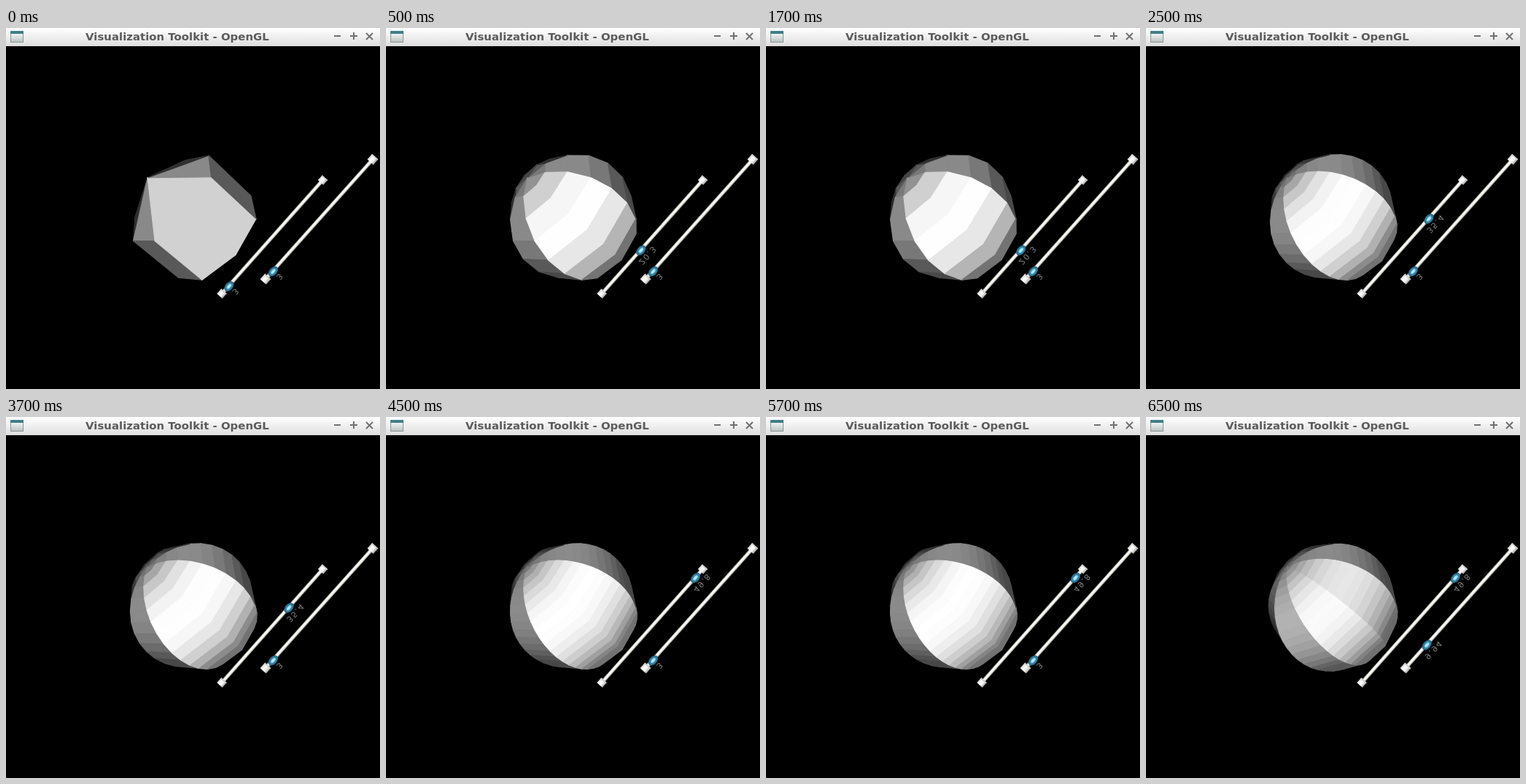
Animation of 513x496 px, one loop 8 s. Source, as an HTML page with a canvas:

```html
<!DOCTYPE html>
<html lang="en">
<head>
<meta charset="utf-8">
<title>Sphere resolution</title>
<style>
  html, body { margin: 0; width: 100%; height: 100%; overflow: hidden; background: #000; }
  canvas { display: block; }
</style>
</head>
<body>
<canvas id="stage" width="513" height="496"></canvas>
<script>
const ctx = document.getElementById('stage').getContext('2d');
const LOOP = 8000, RAD = Math.PI / 180;

// Slider values, facet rows and meridian layout, each held until the next start.
const steps = [
  { start: 0,    phi: 3,    theta: 3,    rows: 3,  turn: 45, offset: 0 },
  { start: 500,  phi: 20.3, theta: 3,    rows: 9,  turn: 45, offset: 0 },
  { start: 2500, phi: 35.4, theta: 3,    rows: 17, turn: 45, offset: 0 },
  { start: 4500, phi: 49.8, theta: 3,    rows: 24, turn: 45, offset: 0 },
  { start: 6500, phi: 49.8, theta: 9.94, rows: 24, turn: 40, offset: 8 }
];

const ball = { x: 257, y: 261, r: 88.5, dist: 10, sin: 0.42, cos: 0.907 };
const axis = { x: 0.75, y: 0.66 };

const sliders = [
  { key: 'phi',   from: [296, 365], to: [434.5, 209], low: [306, 355],     high: [425, 220.5], cap: 10 },
  { key: 'theta', from: [356, 345], to: [503, 180.5], low: [366.5, 334.5], high: [494, 190],   cap: 11 }
];

function grey(b) {
  const v = Math.round(255 * Math.min(1, b));
  return `rgb(${v},${v},${v})`;
}

function project(theta, phi) {
  const side = Math.sin(phi) * Math.sin(theta);
  const front = Math.sin(phi) * Math.cos(theta);
  const up = Math.cos(phi);
  const depth = up * ball.sin + front * ball.cos;
  const k = ball.r * ball.dist / (ball.dist - depth);
  const u = k * (front * ball.sin - up * ball.cos);
  const v = k * side;
  return [ball.x + axis.x * u + axis.y * v, ball.y + axis.y * u - axis.x * v];
}

function area(pts) {
  return pts.reduce((sum, p, i) => {
    const q = pts[(i + 1) % pts.length];
    return sum + p[0] * q[1] - q[0] * p[1];
  }, 0);
}

// Headlight shading; the two front lunes of the coarse ball share one normal.
function shade(theta, phi, step) {
  if (step.turn === 45 && Math.abs(theta) < 45) {
    if (step.rows === 3) return 0.82;
    theta = 0;
  }
  const c = Math.cos(theta * RAD);
  const light = Math.sin(phi * RAD) * c * ball.cos + Math.cos(phi * RAD) * ball.sin;
  return Math.max(light, 0.18 + 0.27 * Math.max(0, c));
}

function drawBall(step) {
  const dPhi = 180 / step.rows;
  ctx.lineWidth = 1.2;
  ctx.lineJoin = 'round';
  for (let i = 0; i < 360 / step.turn; i++) {
    const a = step.offset + i * step.turn, b = a + step.turn;
    let mid = (a + b) / 2;
    if (mid > 180) mid -= 360;
    for (let row = 0; row < step.rows; row++) {
      const p = row * dPhi, q = p + dPhi;
      const pts = [[a, p], [b, p], [b, q], [a, q]]
        .map(([t, f]) => project(t * RAD, f * RAD));
      if (area(pts) <= 0) continue;
      ctx.beginPath();
      pts.forEach(pt => ctx.lineTo(...pt));
      ctx.closePath();
      ctx.fillStyle = ctx.strokeStyle = grey(shade(mid, p + dPhi / 2, step));
      ctx.fill();
      ctx.stroke();
    }
  }
}

function ellipse(rx, ry, color) {
  ctx.fillStyle = color;
  ctx.beginPath();
  ctx.ellipse(0, 0, rx, ry, 0, 0, 7);
  ctx.fill();
}

function placed(x, y, angle, draw) {
  ctx.save();
  ctx.translate(x, y);
  ctx.rotate(angle);
  draw();
  ctx.restore();
}

function blend(x0, y0, x1, y1, stops) {
  const g = ctx.createLinearGradient(x0, y0, x1, y1);
  stops.forEach((c, i) => g.addColorStop(i / (stops.length - 1), c));
  return g;
}

function drawSlider(s, value) {
  const [x, y] = s.from;
  const dx = s.to[0] - x, dy = s.to[1] - y;
  const len = Math.hypot(dx, dy), angle = Math.atan2(dy, dx);

  placed(x, y, angle, () => {
    ctx.fillStyle = blend(0, -2.6, 0, 2.6, ['#85857f', '#f4f4ee', '#ffffff', '#dcdcd4', '#77776f']);
    ctx.fillRect(0, -2.6, len, 5.2);
    const h = s.cap / 2;
    for (const end of [0, len]) {
      ctx.fillStyle = blend(0, -h, 0, h, ['#d2d2d0', '#ffffff', '#f0f0ee', '#a4a4a2']);
      ctx.fillRect(end - h + 0.5, -h, s.cap - 1, s.cap);
      ctx.fillStyle = '#c9c9c7';
      ctx.fillRect(end + h - 2, -h, 1.5, s.cap);
    }
  });

  const f = (value - 3) / 47;
  const kx = s.low[0] + f * (s.high[0] - s.low[0]);
  const ky = s.low[1] + f * (s.high[1] - s.low[1]);
  placed(kx, ky, angle, () => {
    ellipse(8, 5.4, '#1f5873');
    ellipse(7, 4.5, '#357fa2');
    ellipse(4.3, 2.3, '#86d2ee');
    ellipse(2.8, 1.1, '#c4effc');
  });

  // The caption is seen from behind, so it is flipped over its baseline.
  placed(kx + 8.5, ky + 6, angle, () => {
    ctx.scale(1, -1);
    ctx.font = '11px "DejaVu Sans", sans-serif';
    ctx.letterSpacing = '1.5px';
    ctx.textAlign = 'center';
    ctx.textBaseline = 'middle';
    ctx.fillStyle = '#808080';
    ctx.fillText(String(value), 0, 0);
  });
}

function line(x0, y0, x1, y1) {
  ctx.beginPath();
  ctx.moveTo(x0, y0);
  ctx.lineTo(x1, y1);
  ctx.stroke();
}

function drawTitleBar() {
  ctx.fillStyle = blend(0, 0, 0, 25, ['#ffffff', '#dedede']);
  ctx.fillRect(0, 0, 513, 25);

  ctx.fillStyle = '#8b9696';
  ctx.fillRect(6, 4, 18, 16);
  ctx.fillStyle = blend(0, 8, 0, 19, ['#f0f2f2', '#bcc4c4']);
  ctx.fillRect(7, 5, 16, 14);
  ctx.fillStyle = '#3f7f88';
  ctx.fillRect(6, 4, 18, 4);

  ctx.fillStyle = '#5b5b5b';
  ctx.font = 'bold 14.93px "DejaVu Sans", sans-serif';
  ctx.textAlign = 'center';
  ctx.textBaseline = 'alphabetic';
  ctx.fillText('Visualization Toolkit - OpenGL', 234.9, 17);

  ctx.strokeStyle = '#707070';
  ctx.lineWidth = 2;
  line(450, 11, 459, 11);
  line(472, 11, 482, 11);
  line(477, 6, 477, 16);
  line(494, 7, 503, 16);
  line(503, 7, 494, 16);
}

function frame(now) {
  const t = now % LOOP;
  const step = steps.filter(s => s.start <= t).pop();
  ctx.fillStyle = '#000';
  ctx.fillRect(0, 0, 513, 496);
  drawBall(step);
  sliders.forEach(s => drawSlider(s, step[s.key]));
  drawTitleBar();
}

const began = performance.now();
function tick() {
  frame(performance.now() - began);
  requestAnimationFrame(tick);
}
tick();
</script>
</body>
</html>
```
